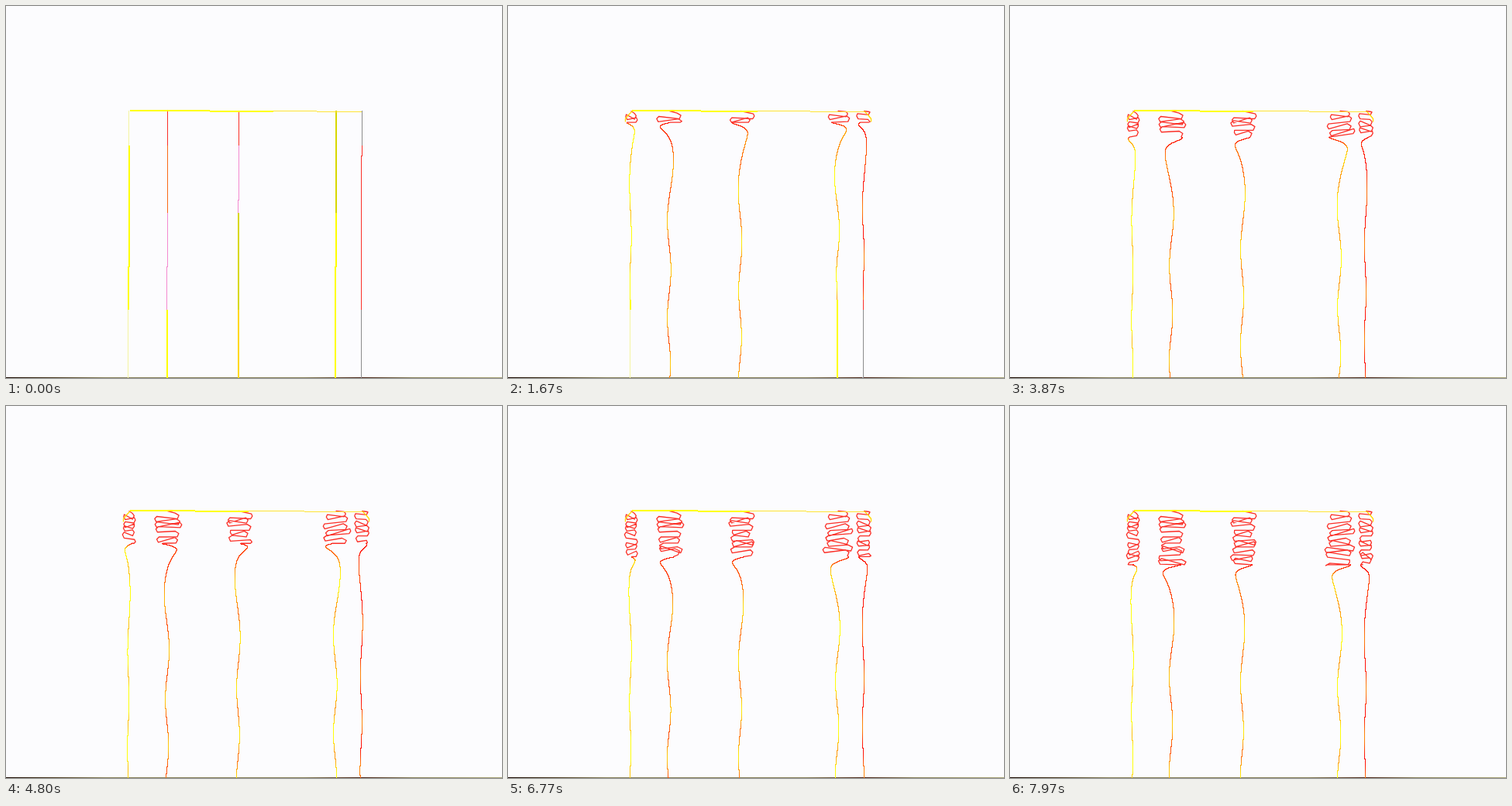
These frames come from a looping animation (640 px wide and 480 px high, 8000 ms). An HTML page with a canvas:

```html
<!DOCTYPE html>
<html lang="en">
<head>
<meta charset="utf-8">
<title>Coiling threads</title>
<style>
  html, body { margin: 0; width: 100%; height: 100%; overflow: hidden; background: #fcfcfe; }
  canvas { display: block; width: 640px; height: 480px; }
</style>
</head>
<body>
<canvas id="stage" width="640" height="480"></canvas>
<script>
const ctx = document.getElementById('stage').getContext('2d');
const LOOP = 8000, CEILING = 135, FLOOR = 479, HALF_WAVE = 60, RISE = 8.7, TURN = 4.2;
const RED = '#fb3028', ORANGE = '#fb6a18', GOLD = '#ffd800', YELLOW = '#ffff00',
      PALE = '#f4f4a0', PINK = '#f48ad0', OLIVE = '#d8d800', GREY = '#8c8c8c';

// spread: half width of the coil. phase and rate: half waves at mid height, and per second.
// reach: px per second the ripple runs down. slack: colours before the ripple arrives.
const threads = [
  { x: 157, spread: 8, phase: 0.3, rate: 1.5, reach: 110, hue: 60, slack: [PALE, YELLOW, YELLOW, PALE] },
  { x: 207, spread: 18, phase: 1.8, rate: 1.4, reach: 260, hue: 32, slack: [RED, ORANGE, PINK, YELLOW] },
  { x: 298.7, spread: 16, phase: 0.56, rate: 1.29, reach: 260, hue: 40, slack: [RED, PINK, OLIVE, GOLD] },
  { x: 424, spread: 18, phase: 0.32, rate: 1.56, reach: 110, hue: 50, slack: [OLIVE, OLIVE, YELLOW, YELLOW] },
  { x: 457.5, spread: 9, phase: -0.08, rate: 1.48, reach: 110, hue: 16, slack: [GREY, RED, RED, GREY] },
];
const SLACK_ENDS = [180, 267, 392, 480];

const lerp = (a, b, u) => a + (b - a) * u;
const clamp = v => Math.min(1, Math.max(0, v));
const noise = n => { const v = Math.sin(n * 127.1) * 43758.5; return v - Math.floor(v); };

// Hard-edged line, one small block per step.
function line(x1, y1, x2, y2, color, w = 1, h = 1) {
  const steps = Math.max(1, Math.ceil(Math.max(Math.abs(x2 - x1), Math.abs(y2 - y1))));
  ctx.fillStyle = color;
  for (let i = 0; i <= steps; i++) {
    const u = i / steps;
    ctx.fillRect(Math.round(lerp(x1, x2, u)), Math.round(lerp(y1, y2, u)), w, h);
  }
}

function stroke(points, color) {
  ctx.beginPath();
  points.forEach(([x, y]) => ctx.lineTo(x + 0.5, y + 0.5));
  ctx.strokeStyle = color;
  ctx.lineWidth = 1.3;
  ctx.lineJoin = 'round';
  ctx.stroke();
}

// A wave climbs the thread, stretches near the coil, then folds tightly into it.
function tailAt(th, y, s, top) {
  const depth = y - top;
  const phase = th.phase + th.rate * s + (y - 350) / HALF_WAVE
    + 0.6 * Math.exp(-depth / 60) - 0.9 * Math.exp(-depth / 8);
  const ripple = 0.12 * clamp((CEILING + th.reach * s + 60 - y) / 60);
  const size = th.spread * (ripple + 0.65 * Math.exp(-depth / 38)) * clamp(s / 0.8);
  const rest = th.x + 1.2 * (FLOOR - y) / (FLOOR - CEILING);
  return { x: rest + size * Math.cos(Math.PI * phase), phase, depth };
}

function tailColor(th, { phase, depth }) {
  const warm = Math.exp(-depth / (64 - th.hue));
  const hue = Math.min(60, th.hue + 15 * Math.cos(2 * Math.PI * phase));
  return `hsl(${lerp(hue, 4, warm)}, 100%, 52%)`;
}

function drawTail(th, s, top) {
  let lastX = tailAt(th, top, s, top).x;
  for (let y = Math.round(top); y <= FLOOR; y++) {
    const p = tailAt(th, y, s, top);
    const slack = s < 0.07 || y > CEILING + th.reach * s + 60;
    const color = slack ? th.slack[SLACK_ENDS.findIndex(end => y < end)] : tailColor(th, p);
    const bold = slack && [YELLOW, GOLD, OLIVE].includes(color);
    line(lastX, y, p.x, y, color, bold ? 2 : 1);
    lastX = p.x;
  }
}

// Each turn settles as a slanted loop with a blunt end, alternating sides.
function drawCoil(th, index, s, top) {
  const points = [[th.x + 1, CEILING]];
  for (let k = 0; 139 + k * TURN < top - 1; k++) {
    const [a, b, c] = [0, 1, 2].map(n => noise(index * 97 + k * 5 + n + 1));
    const side = k % 2 ? -1 : 1;
    const x = th.x + 1.5 + side * th.spread * lerp(0.68, 1.1, a);
    const y = 139 + k * TURN + (b - 0.5) * 7;
    points.push([x - side * th.spread * 0.35 * c, Math.max(136, y - 3)],
                [x, y], [x - side * 2, Math.min(top, y + 3 + 2 * c)]);
  }
  points.push([tailAt(th, top, s, top).x, top]);
  if (points.length > 2) stroke(points, RED);
}

function drawFrame(s) {
  const yellowEnd = 311 + 33 * Math.exp(-s / 1.4);
  line(160, 134, yellowEnd, 134.9, YELLOW, 1, 2);
  line(yellowEnd, 135, 458, 136, '#ffe433');
  if (s < 0.9) return;
  for (const flip of [x => x, x => 619 - x]) {
    stroke([[160, 135], [155, 140], [151, 145], [151, 149]].map(([x, y]) => [flip(x), y]), GOLD);
  }
}

const ground = ctx.createLinearGradient(0, 0, 640, 0);
[[0, '#180800'], [0.1, '#4a3a20'], [0.2, '#88825c'], [0.6, '#88825c'],
 [0.72, '#4a2418'], [0.82, '#88825c'], [1, '#a8a478']].forEach(stop => ground.addColorStop(...stop));

function render(ms) {
  const s = (ms % LOOP) / 1000, top = CEILING + RISE * s;
  ctx.fillStyle = '#fcfcfe';
  ctx.fillRect(0, 0, 640, 480);
  ctx.fillStyle = ground;
  ctx.fillRect(0, FLOOR, 640, 1);
  threads.forEach((th, i) => {
    drawTail(th, s, top);
    drawCoil(th, i, s, top);
  });
  drawFrame(s);
}

const start = performance.now();
function tick() {
  render(performance.now() - start);
  requestAnimationFrame(tick);
}
tick();
</script>
</body>
</html>
```
